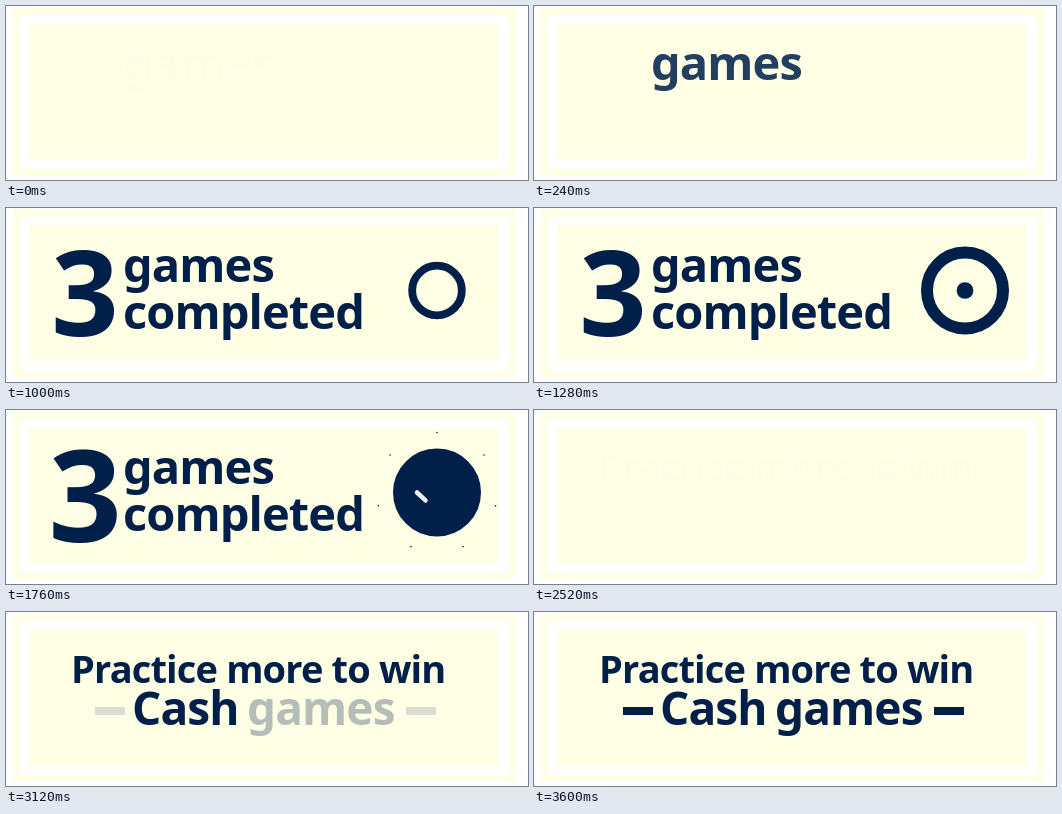
These frames come from a looping animation (522 by 174 pixels, 5.04 s). An HTML page:

```html
<!DOCTYPE html>
<html lang="en">
<head>
<meta charset="utf-8">
<title>Games completed</title>
<style>
  html, body { margin: 0; width: 100%; height: 100%; overflow: hidden; background: #fff; }
  svg { display: block; width: 100%; height: 100%; }
  text { font-family: "Noto Sans", "Open Sans", sans-serif; font-weight: 700; }
</style>
</head>
<body>
<svg viewBox="0 0 522 174" fill="#00204a">
  <rect x="7" y="2" width="502" height="167" fill="#ffffe6"/>
  <rect x="14" y="9" width="489" height="154" fill="#fff"/>
  <rect x="23" y="18" width="469" height="135" fill="#ffffe6"/>

  <g id="result">
    <text id="count" x="79" y="128" font-size="118" text-anchor="middle">3</text>
    <g font-size="47" letter-spacing="-0.9">
      <text id="unit" x="117" y="74">games</text>
      <text id="state" x="117" y="121">completed</text>
    </g>
    <g transform="translate(431 82.5)">
      <circle id="ring" r="38" fill="none" stroke="#00204a" stroke-width="12"/>
      <circle id="core"/>
      <path id="check" d="M-20 0L-6 13L21 -14" pathLength="1" fill="none"
            stroke="#edf2f5" stroke-width="4.5" stroke-linecap="round" stroke-linejoin="round"/>
      <g id="sparks"></g>
    </g>
  </g>

  <g id="advice">
    <text id="practice" x="65" y="71" font-size="38" letter-spacing="-0.85">Practice more to win</text>
    <g font-size="46" letter-spacing="-0.9">
      <text id="cash" x="126" y="113">Cash</text>
      <text id="prize" x="241" y="113">games</text>
    </g>
    <path id="dashes" d="M89 95h30v8h-30zM400 95h30v8h-30z"/>
  </g>
</svg>
<script>
  const LOOP = 5040, SWITCH = 2520, SPARKS = 7;
  const el = id => document.getElementById(id);
  const set = (node, attrs) => {
    for (const name in attrs) node.setAttribute(name, attrs[name]);
  };
  const progress = (t, from, to) => Math.min(1, Math.max(0, (t - from) / (to - from)));

  // Start and end of each fade, in ms.
  const fades = {
    unit: [0, 280], state: [280, 560], count: [440, 720],
    practice: [2520, 2800], cash: [2760, 3080], prize: [3040, 3320], dashes: [3040, 3600]
  };

  const sparks = Array.from({ length: SPARKS }, () =>
    el("sparks").appendChild(document.createElementNS(el("ring").namespaceURI, "circle")));

  function draw(t) {
    set(el("result"), { visibility: t < SWITCH ? "visible" : "hidden" });
    set(el("advice"), { visibility: t < SWITCH ? "hidden" : "visible" });
    for (const id in fades) set(el(id), { opacity: progress(t, ...fades[id]) });

    const pulse = 1 + 0.09 * Math.sin(Math.PI * progress(t, 1440, 2000));
    set(el("count"), { transform: `translate(78 85) scale(${pulse}) translate(-78 -85)` });

    set(el("ring"), { transform: `scale(${progress(t, 720, 1150)})` });
    set(el("core"), { r: 33 * progress(t, 1200, 1520) });

    const drawn = progress(t, 1680, 2080);
    set(el("check"), { "stroke-dasharray": `${drawn} 2`, opacity: drawn > 0 ? 1 : 0 });

    const burst = progress(t, 1440, 1880);
    sparks.forEach((spark, i) => {
      const angle = i * 2 * Math.PI / SPARKS, distance = 44 + 22 * burst;
      set(spark, {
        cx: distance * Math.sin(angle),
        cy: -distance * Math.cos(angle),
        r: burst > 0 ? 3 * (1 - burst) : 0
      });
    });
  }

  const start = performance.now();
  function frame() {
    draw((performance.now() - start) % LOOP);
    requestAnimationFrame(frame);
  }
  frame();
</script>
</body>
</html>
```
